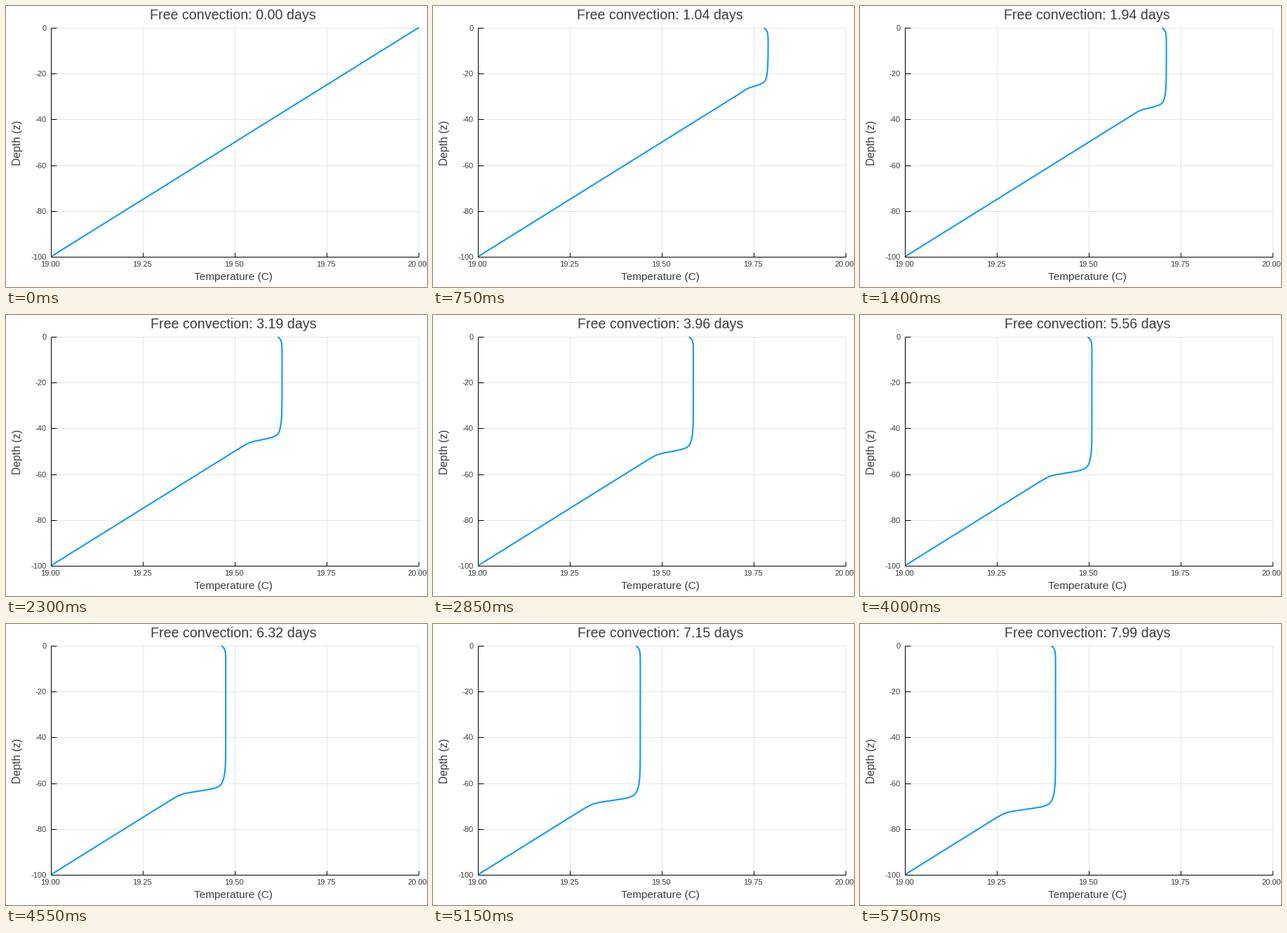
Write a matplotlib script that moves like this. It is 600x400 px and loops after 5800 ms.

```python
import numpy as np
import matplotlib.pyplot as plt
from matplotlib.animation import FuncAnimation
from matplotlib.patches import Rectangle

W, H, DPI = 600, 400, 100
FRAMES, INTERVAL = 116, 50
DAYS_PER_FRAME = 10 / 144
LEFT, RIGHT, TOP, BOTTOM = 64, 588, 30, 356
INK, BLUE = "#3c3c3c", "#009af9"
SLOPE = (RIGHT - LEFT) / (BOTTOM - TOP)
METRE = (BOTTOM - TOP) / 100

plt.rcParams["font.family"] = "Liberation Sans"

fig = plt.figure(figsize=(W / DPI, H / DPI), dpi=DPI, facecolor="white")
ax = fig.add_axes([0, 0, 1, 1])
# Offsets just off the half pixel make integer lines snap to their own pixel.
ax.set_xlim(-0.4, W - 0.4)
ax.set_ylim(H - 0.6, -0.6)
ax.axis("off")


def label(x, y, text, px, **kw):
    kw = {"ha": "center", "va": "baseline", "color": INK, **kw}
    return ax.text(x, y, text, fontsize=px * 72 / DPI, **kw)


def stroke(xs, ys, color="black", width=1, **kw):
    kw = {"solid_capstyle": "butt", **kw}
    return ax.plot(xs, ys, color=color, lw=width * 72 / DPI, **kw)[0]


def softplus(x, width):
    return width * np.logaddexp(0, x / width)


def linear_x(y):
    return RIGHT - SLOPE * (y - TOP)


def profile(days):
    """Pixel curve: cool skin, mixed layer, sharp step, linear gradient."""
    if days == 0:
        y = np.array([TOP, BOTTOM])
        return linear_x(y), y
    y = np.linspace(TOP + 0.6, BOTTOM - 0.3, 900)
    mixed = RIGHT - (RIGHT - LEFT) * 0.207 * days ** 0.505
    base = TOP + 0.4 + METRE * 25.45 * np.sqrt(days)
    u = y - base
    jump = mixed - linear_x(base + 5)
    logit = -1.85 + 0.09 * (u + 6) + 0.36 * softplus(u + 6, 2.5)
    step = jump / (1 + np.exp(-logit))
    below = SLOPE * softplus(u - 5, 1.6)
    skin = 6.2 * np.exp(-(y - TOP - 0.6) / 3.8)
    return mixed - step - below - skin, y


x_ticks = np.linspace(LEFT, RIGHT, 5)
y_ticks = np.round(np.linspace(TOP, BOTTOM, 6))
for i, x in enumerate(x_ticks):
    stroke([x, x], [TOP, BOTTOM], "#e6e6e6")
    label(x - 1.8, 370, f"{19 + i / 4:.2f}", 11.1)
for i, y in enumerate(y_ticks):
    stroke([LEFT, RIGHT], [y, y], "#e6e6e6")
    label(57, y + 4, str(-20 * i), 11.1, ha="right")

stroke([LEFT, RIGHT], [BOTTOM, BOTTOM])
stroke([LEFT, LEFT], [TOP, BOTTOM])
for x in x_ticks:
    stroke([x, x], [BOTTOM, BOTTOM - 5.5])
for y in y_ticks:
    stroke([LEFT, LEFT + 7.5], [y, y])

label(323.8, 389, "Temperature (C)", 15.4)
label(23.8, 194, "Depth (z)", 15.6, rotation=90, ha="right", va="center")
title = label(323.4, 18.4, "", 19.6)

curve = stroke([], [], BLUE, 2, solid_joinstyle="round", zorder=4)
box = Rectangle((LEFT - 0.5, TOP - 0.5), RIGHT - LEFT + 1, BOTTOM - TOP + 1,
                transform=ax.transData)
curve.set_clip_path(box)


def update(n):
    days = n * DAYS_PER_FRAME
    curve.set_data(*profile(days))
    title.set_text(f"Free convection: {days:.2f} days")
    return curve, title


anim = FuncAnimation(fig, update, frames=FRAMES, interval=INTERVAL,
                     repeat=True)
plt.show()
```
